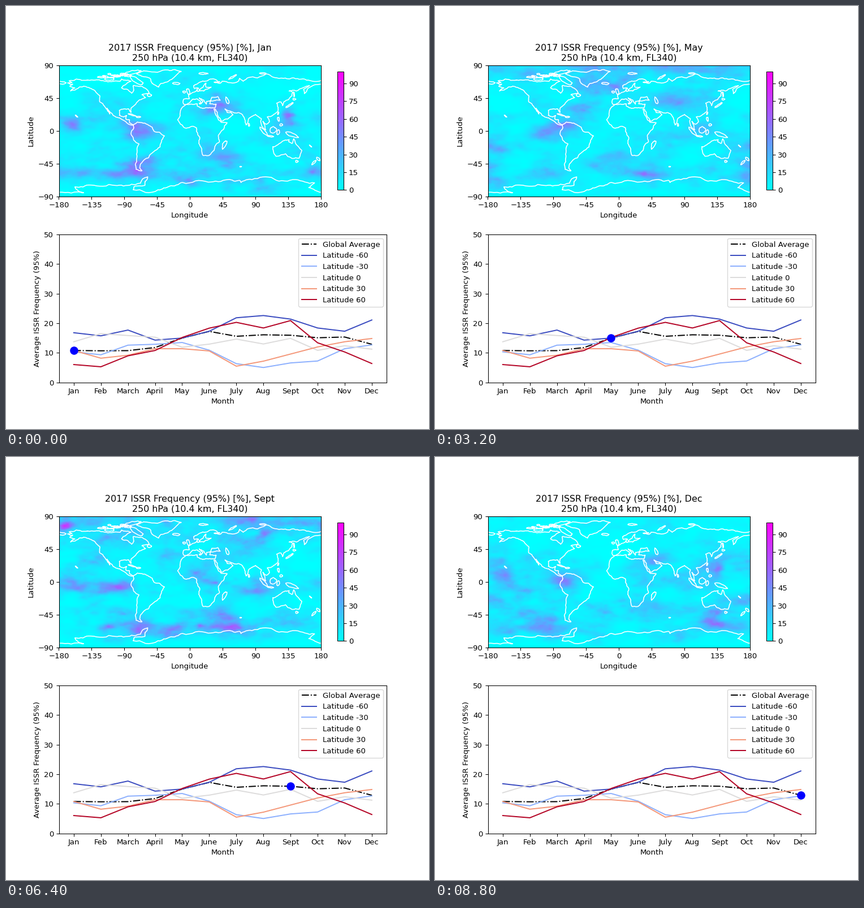
Animation of 748x748 px, one loop 9.6 s. Source, as a matplotlib script:

```python
import numpy as np
import matplotlib.pyplot as plt
from matplotlib.animation import FuncAnimation

DPI = 95
MONTHS = ["Jan", "Feb", "March", "April", "May", "June",
          "July", "Aug", "Sept", "Oct", "Nov", "Dec"]

average = [10.8, 10.7, 10.75, 11.8, 15, 17.25, 15.6, 16.1, 15.95, 15.1, 15.35, 12.9]
by_latitude = {
    -60: [16.8, 15.75, 17.7, 14.3, 15, 17.3, 21.85, 22.6, 21.4, 18.4, 17.3, 21.1],
    -30: [10.35, 9.35, 12.6, 12.9, 13.5, 10.9, 6.35, 5.05, 6.6, 7.25, 11.4, 12.7],
    0: [13.75, 16.5, 15.85, 15.3, 11.9, 12.95, 14.65, 13, 14.9, 10.85, 12.4, 11.25],
    30: [10.8, 8.2, 9.2, 11.4, 11.4, 10.65, 5.5, 7.2, 9.6, 12, 13.75, 14.85],
    60: [6.05, 5.3, 9, 10.8, 15.2, 18.35, 20.3, 18.4, 20.9, 13.4, 10.3, 6.4],
}

fig, (ax, chart) = plt.subplots(2, 1, figsize=(748 / DPI, 748 / DPI), dpi=DPI)


# --- humidity field -------------------------------------------------------

lon, lat = np.meshgrid(np.arange(-179.5, 180), np.arange(-89.5, 90))

# lon, lat, width, height, peak, month of the peak
PATCHES = [
    (-65, 2, 21, 8, 36, 1), (-80, -1, 11, 7, 30, 10.5), (-106, -4, 18, 7, 46, 7),
    (-160, 8, 12, 8, 34, 0), (-165, -7, 14, 5, 22, 7), (88, -9, 18, 5, 36, 7),
    (115, 3, 16, 8, 26, 2), (133, 19, 6, 7, 38, 0), (38, 32, 20, 8, 28, 11),
    (48, -37, 20, 7, 26, 0.5), (-105, -62, 28, 6, 36, 1), (170, -62, 18, 7, 20, 0),
    (-62, -62, 15, 8, 26, 7.5), (38, -62, 16, 6, 32, 6.5), (0, -41, 40, 7, 17, 5.5),
    (75, 42, 22, 8, 18, 4), (65, 85, 55, 6, 32, 6), (-120, 83, 40, 6, 26, 5.5),
]


def season(month, peak):
    return ((1 + np.cos((month - peak) * np.pi / 6)) / 2) ** 1.5


def noise(rng, power, stretch=2):
    """Smooth random field, drawn out along the parallels, unit variance."""
    ky = np.fft.fftfreq(180)[:, None] * 180
    kx = np.fft.fftfreq(360)[None, :] * 180 * stretch
    spectrum = (16 + kx**2 + ky**2) ** (-power / 2)
    spectrum[0, 0] = 0
    field = np.fft.ifft2(np.fft.fft2(rng.normal(size=(180, 360))) * spectrum).real
    return field / field.std()


def humidity(month):
    """Charted latitude means, seasonal patches and a streaky texture."""
    rng = np.random.default_rng(month + 40)
    x = lon + 3.5 * noise(rng, 2.2)
    y = lat + 1.8 * noise(rng, 2.2)
    texture = noise(rng, 2.1)
    poles = [3, *(v[month] for v in by_latitude.values()), 7 + 25 * season(month, 6.5)]
    zonal = np.interp(y, np.arange(-90, 91, 30), poles)
    field = 0.8 * zonal * np.exp(0.55 * texture - 0.15)
    for cx, cy, width, height, peak, peak_month in PATCHES:
        dx = (x - cx + 180) % 360 - 180
        bump = np.exp(-((dx / width) ** 2 + ((y - cy) / height) ** 2) / 1.6)
        field += peak * season(month, peak_month) * bump * (1 + 0.2 * texture)
    return np.clip(field - 2, 0, 100)


fields = [humidity(i) for i in range(12)]
image = ax.imshow(fields[0], origin="lower", extent=(-180, 180, -90, 90),
                  cmap="cool", vmin=0, vmax=100)
fig.colorbar(image, ax=ax, shrink=0.8, ticks=range(0, 100, 15))


# --- coastlines -----------------------------------------------------------

shore_rng = np.random.default_rng(5)


def coast(points, levels=3):
    """Join key points by a line roughened by midpoint displacement."""
    for _ in range(levels):
        step = np.diff(points, axis=0)
        shift = shore_rng.uniform(-.12, .12, (len(step), 1))
        line = np.empty((2 * len(points) - 1, 2))
        line[::2] = points
        line[1::2] = points[:-1] + step / 2 + step[:, ::-1] * [-1, 1] * shift
        points = line
    ax.plot(*points.T, color="white", lw=1.2)


def shore(*coords):
    coast(np.array(coords, float).reshape(-1, 2))


def island(x, y, length, width, tilt=0):
    """Ragged ellipse around x, y."""
    t = np.linspace(0, 2 * np.pi, 9)
    radius = shore_rng.uniform(.75, 1.15, 9)
    radius[-1] = radius[0]
    along, across = length / 2 * radius * np.cos(t), width / 2 * radius * np.sin(t)
    c, s = np.cos(np.radians(tilt)), np.sin(np.radians(tilt))
    coast(np.column_stack([x + along * c - across * s, y + along * s + across * c]), 1)


# North America: Pacific side, then Atlantic and Arctic side
shore(-141, 69.6, -156, 71, -166, 68.4, -162, 66, -168, 65.6, -161, 64, -165, 61,
      -158, 58.7, -164, 54.7, -152, 60, -140, 59.6, -130, 54.5, -124, 48.5, -124, 40,
      -117, 33, -110, 23, -114, 31, -105.5, 21, -94, 16, -83, 8.5, -78, 8)
shore(-78, 8, -83, 11, -83, 15, -88, 16, -87, 21, -91, 19, -97, 21, -97, 28, -84, 30,
      -81, 25.2, -81, 31, -75, 36, -70, 42, -61, 45.5, -66, 49.5, -56, 52, -64.6, 60,
      -70, 61, -78, 62, -77, 56, -80, 51.5, -94, 59, -86, 66, -81, 68, -94, 71,
      -96, 68, -115, 68, -128, 70, -141, 69.6)
# South America
shore(-78, 8, -77, 4, -81, -4, -76, -14, -70, -18, -73, -37, -75, -47, -74, -53,
      -66, -55, -69, -51, -65, -42, -57, -37, -48, -27, -41, -22, -39, -13, -35, -7,
      -50, 0, -52, 5, -62, 10.5, -72, 12, -78, 8)
# Greenland
shore(-73, 78, -60, 82, -30, 83.5, -12, 81.5, -20, 75, -25, 70.5, -40, 65, -43, 60,
      -52, 65, -54, 71, -68, 76, -73, 78)
# Northern Eurasia and Europe
shore(180, 69, 160, 69.5, 140, 72.5, 128, 72, 113, 74, 104, 77.7, 80, 73, 73, 68,
      68, 72, 67, 68.5, 44, 68, 41, 65, 33, 66.7, 41, 67, 28, 71, 14, 67, 5, 62,
      6, 58, 11, 59, 13, 55.5, 18, 60, 22, 65.5, 22, 60, 29, 60, 22, 57, 19, 54.5,
      10.5, 54, 10, 57.5, 8, 54, -2, 49, -1, 44, -9, 43, -9, 37, -5.4, 36, 0, 39,
      4, 43.4, 10, 43.8, 16, 38, 18, 40, 12.5, 45, 19, 42, 22.5, 36.5, 23, 40.5,
      28, 41, 30, 46, 38, 47, 41.5, 42, 28, 41, 27, 37, 36, 36.5, 34, 31.3)
# Africa
shore(34, 31.3, 20, 31, 10, 34, 10, 37, -6, 36, -13, 28, -17, 15, -8, 4.4, 5, 6, 9, 4,
      9, -1, 13.5, -10, 12, -17, 18, -34, 26, -34, 33, -27, 35, -20, 40.5, -15,
      39, -6, 51, 11, 43, 11.5, 37, 20, 33, 29.5)
# Southern and eastern Asia
shore(33, 29.5, 35, 29.5, 43, 13, 59, 22, 56, 25.5, 51, 25, 48, 30, 57, 26, 67, 25,
      73, 20, 77, 8, 80, 15, 90, 22.5, 98, 16.5, 98, 8, 104, 1.3, 100, 13, 105, 9,
      109, 12, 106, 19, 120, 26, 121, 32, 119, 38, 125, 39.5, 127, 34.5, 129, 40,
      140, 48, 141, 53, 136, 54.5, 155, 59, 164, 62, 156, 57, 157, 51, 163, 59, 180, 64)
shore(-180, 69, -170, 66, -173, 64.3, -180, 65)
# Australia
shore(114, -22, 115.7, -32, 118, -35, 131, -31.5, 140, -38, 150, -37.5, 153.5, -27,
      146, -19, 142.5, -11, 140, -17.5, 135.5, -15, 136, -12, 130, -13, 122, -18,
      114, -22)
# Antarctica
shore(-180, -84.3, -146, -85, -155, -81, -158, -77, -136, -74.5, -103, -75, -80, -73.3,
      -68, -72, -65, -66, -58, -63.3, -62, -70, -62, -75, -77, -77, -78, -81, -44, -81,
      -28, -76, -10, -71, 25, -70.5, 52, -67, 68, -68, 70, -71, 85, -67, 115, -66,
      145, -67, 171, -71.5, 163, -78, 180, -84.3)

island(-2.5, 54, 9, 4, 110)        # Great Britain
island(-8, 53.3, 4, 3)             # Ireland
island(-19, 65, 10, 3)             # Iceland
island(51, 41.5, 10, 4, 110)       # Caspian Sea
island(14, 37.5, 3, 1.5)           # Sicily
island(47, -19, 14, 5, 70)         # Madagascar
island(81, 7.8, 4, 2, 100)         # Sri Lanka
island(100.5, 0, 16, 4, -47)       # Sumatra
island(110, -7.3, 9, 1.5, -8)      # Java
island(114, 1, 11, 8, 50)          # Borneo
island(121, -2, 8, 4, 80)          # Sulawesi
island(140, -5.5, 22, 6, -22)      # New Guinea
island(121.5, 16, 6, 2.5, 100)     # Luzon
island(125, 8, 4, 3)               # Mindanao
island(121, 23.7, 3.5, 1.5, 70)    # Taiwan
island(137, 35.5, 14, 2.5, 35)     # Honshu
island(143, 43.4, 4, 3)            # Hokkaido
island(142.7, 50, 8, 1.5, 95)      # Sakhalin
island(146.5, -42, 3.5, 3)         # Tasmania
island(176, -38.5, 6, 3, -50)      # New Zealand, north
island(170, -43.7, 8, 2.5, 45)     # New Zealand, south
island(165.5, -21, 4, .7, -40)     # New Caledonia
island(-79, 21.6, 11, 1.5, -17)    # Cuba
island(-71, 19, 6, 2)              # Hispaniola
island(-156, 20.3, 4, 1, -40)      # Hawaii
island(69.5, -49.2, 2, 1)          # Kerguelen
island(-56, 49, 6, 4)              # Newfoundland
island(-73, 69, 24, 6, -35)        # Baffin
island(-79, 80, 22, 5, 12)         # Ellesmere
island(-110, 71, 14, 4)            # Victoria
island(18, 78.5, 14, 3)            # Svalbard
island(59, 74, 14, 2, 30)          # Novaya Zemlya
island(100, 79, 9, 2)              # Severnaya Zemlya
for k in range(11):                # Canadian Arctic
    island(-122 + 3.7 * k, 75.5 + shore_rng.uniform(-3, 3),
           shore_rng.uniform(4, 11), shore_rng.uniform(1, 2.5))

ax.set(xlim=(-180, 180), ylim=(-90, 90), xticks=range(-180, 181, 45),
       yticks=range(-90, 91, 45), xlabel="Longitude", ylabel="Latitude")


# --- monthly averages -----------------------------------------------------

chart.plot(MONTHS, average, "k-.", label="Global Average")
for (degrees, values), color in zip(by_latitude.items(),
                                    plt.cm.coolwarm(np.linspace(0, 1, 5))):
    chart.plot(MONTHS, values, color=color, label=f"Latitude {degrees}")
marker, = chart.plot([0], average[:1], "bo", markersize=10, zorder=5)
chart.set(ylim=(0, 50), xlabel="Month", ylabel="Average ISSR Frequency (95%)")
chart.legend(loc="upper right")


def update(i):
    image.set_data(fields[i])
    ax.set_title(f"2017 ISSR Frequency (95%) [%], {MONTHS[i]}\n"
                 "250 hPa (10.4 km, FL340)")
    marker.set_data([i], [average[i]])
    return image, marker


animation = FuncAnimation(fig, update, frames=12, interval=800, repeat=True)
plt.show()
```
